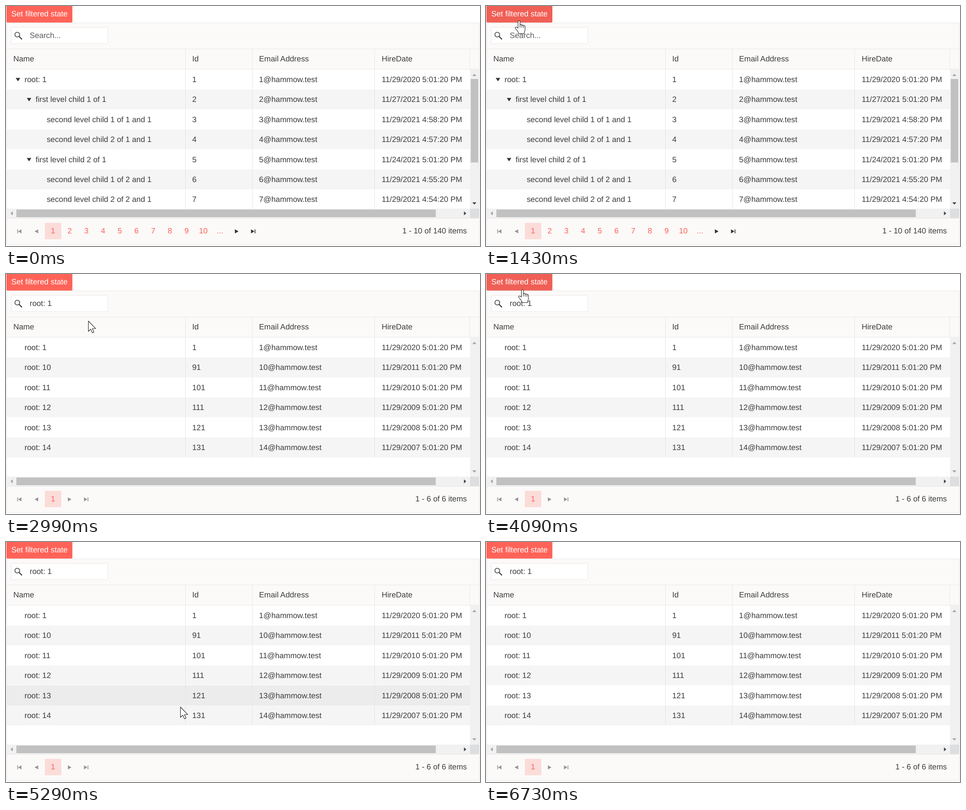
An HTML page that plays this animation: 1050x533 px, repeating every 7940 ms.

```html
<!DOCTYPE html>
<html lang="en">
<head>
<meta charset="utf-8">
<title>Tree list filter</title>
<style>
html, body { margin: 0; height: 100%; overflow: hidden; background: #fff; }
svg { display: block; width: 100%; height: 100%; }
text { font: 17.27px "Liberation Sans", Arial, sans-serif; text-rendering: geometricPrecision; white-space: pre; }
</style>
</head>
<body>
<svg id="stage" viewBox="0 0 1050 533"></svg>
<script>
const LOOP = 7940, STEP = 69.2, ROW = 44.4, TOP = 141;
const INK = '#3c3c3c', RED = '#ff6358', PANEL = '#fbfaf9', LINE = '#e8e7e6', DIM = '#949494';
const columns = [397, 545, 816];
const textX = [41, 412.5, 560.6, 832.2];

// Pointer trips: start time and [step, x, y] points
const trips = [
  { start: 520, end: 2580, path: [[0, 688, 497], [2, 600, 432], [5, 400, 311], [8, 148, 103],
    [10, 100, 62], [11, 92, 54], [12, 76, 35], [13, 74, 33]] },
  { start: 2580, end: 6725, path: [[0, 78, 35], [3, 130, 75], [6, 182, 104], [8, 196, 120],
    [11, 165, 100], [14, 110, 60], [16, 80, 30], [20, 75, 25], [22, 88, 45], [24, 100, 66],
    [27, 112, 95], [30, 140, 138], [32, 170, 188], [33, 184, 201], [35, 240, 281], [39, 386, 366],
    [41, 470, 408], [47, 640, 436], [59, 926, 531]] }
];

const mail = n => n + '@hammow.test';
const treeRows = [
  ['root: 1', 0, '11/29/2020 5:01'],
  ['first level child 1 of 1', 1, '11/27/2021 5:01'],
  ['second level child 1 of 1 and 1', 2, '11/29/2021 4:58'],
  ['second level child 2 of 1 and 1', 2, '11/29/2021 4:57'],
  ['first level child 2 of 1', 1, '11/24/2021 5:01'],
  ['second level child 1 of 2 and 1', 2, '11/29/2021 4:55'],
  ['second level child 2 of 2 and 1', 2, '11/29/2021 4:54']
].map(([name, level, date], i) => ({ name, level, open: level < 2, id: i + 1, mail: mail(i + 1), date }));
const rootRows = [1, 10, 11, 12, 13, 14].map(n => ({
  name: 'root: ' + n, level: 0, id: n * 10 - 9, mail: mail(n), date: `11/29/${2021 - n} 5:01`
}));

const rect = (x, y, w, h, fill, more = '') =>
  `<rect x="${x}" y="${y}" width="${w}" height="${h}" fill="${fill}" ${more}/>`;
const text = (x, y, s, fill = INK, anchor = 'start') =>
  `<text x="${x}" y="${y}" fill="${fill}" text-anchor="${anchor}">${s}</text>`;
// Triangle centred on x, y; w across its base, h to its tip, pointing down at angle 0
const tri = (x, y, w, h, angle, fill) =>
  `<path d="M${-w / 2} ${-h / 2}H${w / 2}L0 ${h / 2}z" fill="${fill}" transform="translate(${x} ${y}) rotate(${angle})"/>`;
const inside = (p, x, y, w, h) => p && p[0] >= x && p[0] < x + w && p[1] >= y && p[1] < y + h;

function along(path, step) {
  const next = path.findIndex(k => k[0] > step);
  if (next < 0) return path[path.length - 1].slice(1);
  if (!next) return path[0].slice(1);
  const a = path[next - 1], b = path[next], u = (step - a[0]) / (b[0] - a[0]);
  return [a[1] + (b[1] - a[1]) * u, a[2] + (b[2] - a[2]) * u];
}

function header(t, hot, filtered) {
  const over = inside(hot, 1, 0, 146, 37);
  const pressed = t >= 1760 && t < 1900;
  let s = rect(1, 37, 1048, 492.5, PANEL) +
    rect(1, -4, 146, 40.7, pressed ? '#e0574e' : over ? '#f05f55' : RED, 'rx="2"') +
    text(11.7, 22.8, 'Set filtered state', '#fff');
  if (filtered) s += rect(148.5, 0, 1, 37, '#f3f2f2');
  s += rect(12, 47.5, 213.5, 36, '#fff',
      `rx="2" stroke="${inside(hot, 12, 47, 214, 37) ? '#d2d2d2' : '#e9e8e7'}"`) +
    '<g fill="none" stroke="#333"><circle cx="25" cy="63.5" r="5.3" stroke-width="1.5"/>' +
    '<path d="M29 67.500L35.300 74" stroke-width="2.300"/></g>' +
    text(52.4, 71, filtered ? 'root: 1' : 'Search...', filtered ? INK : '#5c5c5c');
  ['Name', 'Id', 'Email Address', 'HireDate'].forEach((name, i) =>
    s += text(i ? textX[i] : 16.2, 123.4, name));
  return s + [...columns, 1027].map(x => rect(x, 96, 1, 45, LINE)).join('');
}

function body(rows, hot) {
  let s = rect(2, TOP, 1026, 309, '#fff');
  rows.forEach((r, i) => {
    const y = TOP + i * ROW, base = y + 28, x = textX[0] + r.level * 24.6;
    const over = inside(hot, 2, y, 1025, ROW) && hot[1] < 450;
    s += rect(2, y, 1026, ROW, over ? '#ececec' : i % 2 ? '#f5f5f5' : '#fff') +
      columns.map(c => rect(c, y, 1, ROW, '#e4e4e4')).join('') +
      (r.open ? tri(x - 14.5, y + 22.6, 10, 7.5, 0, '#333') : '') +
      [r.name, r.id, r.mail, r.date + ':20 PM'].map((v, c) => text(c ? textX[c] : x, base, v)).join('');
  });
  return s;
}

function scrollbars(hot, filtered) {
  const dark = '#404040', pale = '#a3a3a3';
  return rect(1028, TOP, 20, 309, '#f1f1f1') + rect(2, 450, 1026, 21, '#f1f1f1') +
    rect(1028, 450, 20, 21, '#dcdedf') +
    (filtered ? '' : rect(1029.5, 162, 16.5, 185.5, '#c1c1c1')) +
    rect(23, 452, 929, 17, inside(hot, 23, 452, 929, 17) ? '#a8a8a8' : '#c1c1c1') +
    tri(1037.5, 153, 9, 5, 180, pale) + tri(1037.5, 438.5, 9, 5, 0, filtered ? pale : dark) +
    tri(12.5, 460.5, 9, 5, 90, pale) + tri(1017, 460.5, 9, 5, -90, dark);
}

function pager(filtered) {
  const pages = filtered ? [1] : [1, 2, 3, 4, 5, 6, 7, 8, 9, 10, '...'];
  const at = i => 104 + 37 * i, next = at(pages.length), last = next + 37;
  const fill = filtered ? DIM : '#333';
  return rect(2, 471, 1046, 58, PANEL) + rect(86, 481.5, 36.5, 36.5, '#fbdcd9') +
    pages.map((p, i) => text(at(i), 505.4, p, RED, 'middle')).join('') +
    rect(24.8, 496, 1.6, 9, DIM) + tri(30.5, 500.5, 9, 7.5, 90, DIM) + tri(67.3, 500.5, 9, 8, 90, DIM) +
    tri(next, 500.5, 9, 8, -90, fill) + tri(last - 1.5, 500.5, 9, 7.5, -90, fill) +
    rect(last + 2.8, 496, 1.6, 9, fill) +
    text(1021, 505.4, filtered ? '1 - 6 of 6 items' : '1 - 10 of 140 items', INK, 'end');
}

function pointer(p) {
  const hand = inside(p, 1, 0, 146, 37);
  const d = hand
    ? 'M-3 16V2a2.2 2.2 0 0 1 4.4 0V10a2 2 0 0 1 4 .3a2 2 0 0 1 3.8 .8a1.9 1.9 0 0 1 3.300 1.200' +
      'V20c0 3-2 4-2 8.500H-1.500C-2 24-6 21-9 16.500c-1-2.200 1.500-3.500 3-2.200z' +
      'M1.400 10v5M5.400 10.500v4.500M9.200 11.500v4'
    : 'M.5 .5V23.500L5.700 18.500L9.300 26.700L12.800 25.200L9.300 17.200H16.500z';
  return `<path d="${d}" transform="translate(${p})" fill="#fff" stroke="#222" stroke-width="1.1" stroke-linejoin="round"/>`;
}

function scene(t) {
  const filtered = t >= 1900;
  const trip = trips.find(k => t >= k.start && t < k.end);
  let now, hot;
  if (trip) {
    const step = Math.floor((t - trip.start + 6) / STEP);
    now = along(trip.path, step);
    hot = along(trip.path, step - 1); // hover trails the pointer by one step
  }
  return header(t, hot, filtered) + body(filtered ? rootRows : treeRows, hot) +
    scrollbars(hot, filtered) + pager(filtered) +
    [37, 95, 140, 471, 529].map(y => rect(1, y, 1048, 1, LINE)).join('') +
    rect(1, 37, 1, 493, LINE) + rect(1048, 37, 1, 493, LINE) +
    (now ? pointer(now) : '');
}

const stage = document.getElementById('stage');
let shown = '';
function frame() {
  const markup = scene(performance.now() % LOOP);
  if (markup !== shown) stage.innerHTML = shown = markup;
  requestAnimationFrame(frame);
}
frame();
</script>
</body>
</html>
```
